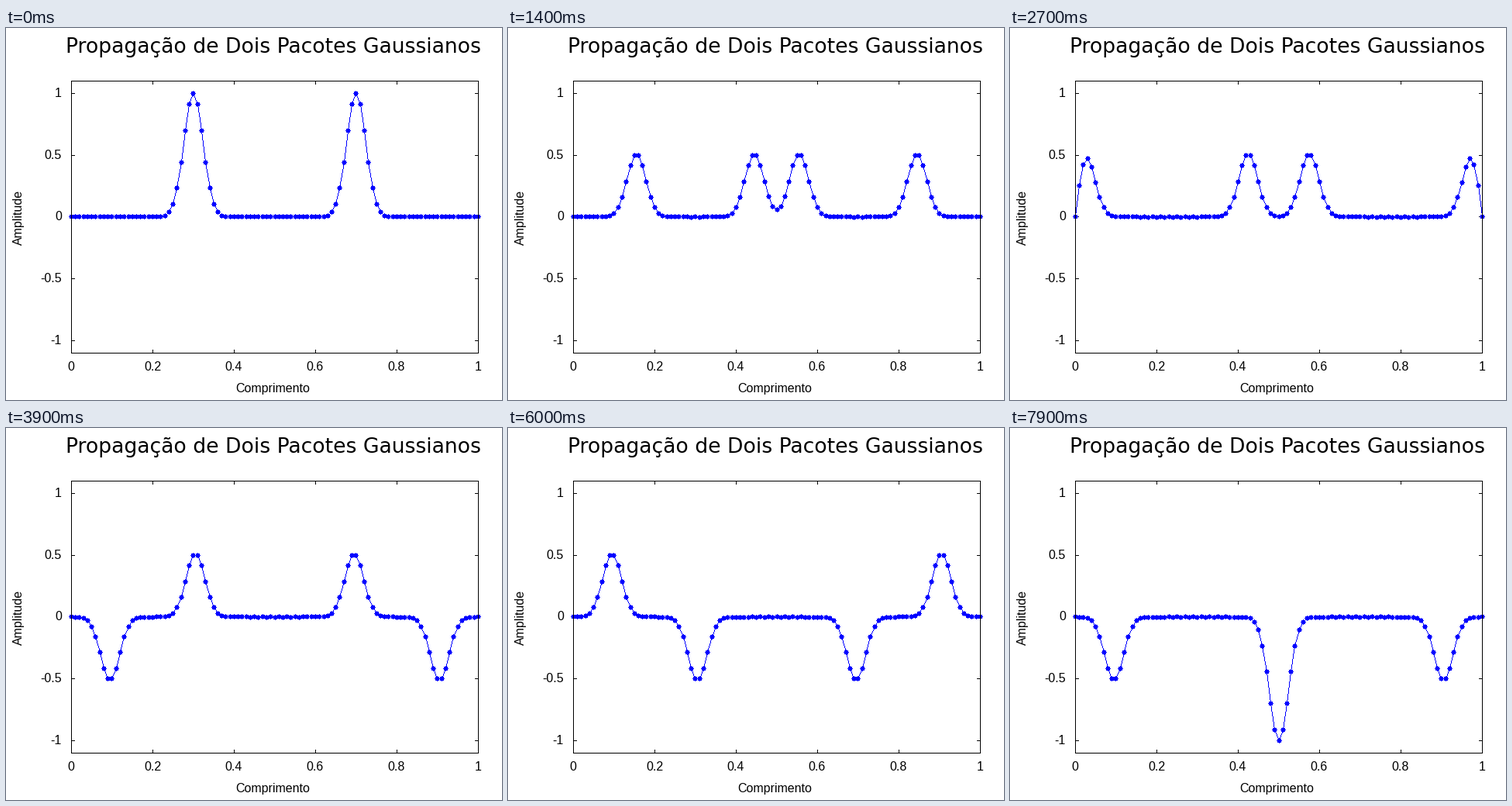
Recreate the animation shown at these times as a matplotlib script. Size 640x480 px, loop 8 s.

```python
import numpy as np
import matplotlib.pyplot as plt
from matplotlib.animation import FuncAnimation
from matplotlib.patches import PathPatch
from matplotlib.path import Path

W, H, DPI = 640, 480, 96
LEFT, RIGHT, TOP, BOTTOM = 84, 609, 68, 419
FRAMES, STEP_MS = 80, 100
N = 101
TIC = 4

fig = plt.figure(figsize=(W / DPI, H / DPI), dpi=DPI, facecolor="white")
ax = fig.add_axes([0, 0, 1, 1])
ax.set(xlim=(0, W), ylim=(H, 0))
ax.axis("off")


def px(x):
    """Pixel column of a length in 0..1."""
    return np.floor(LEFT + (RIGHT - LEFT) * np.asarray(x, float) + 0.5)


def py(v):
    """Pixel row of an amplitude in -1.1..1.1."""
    middle = (TOP + BOTTOM) / 2
    return np.ceil(middle - (BOTTOM - TOP) / 2.2 * np.asarray(v, float) - 0.5)


def boxes(x, y, rx=0, ry=0):
    """Corners of pixel blocks reaching rx, ry around each pixel."""
    x0, x1, y0, y1 = x - rx, x + rx + 1, y - ry, y + ry + 1
    return np.stack([np.stack(p, -1) for p in
                     ((x0, y0), (x1, y0), (x1, y1), (x0, y1), (x0, y0))], 1)


def solid(polys):
    return Path.make_compound_path_from_polys(np.asarray(polys, float))


def fill(path, color, z):
    patch = PathPatch(path, fc=color, ec="none", lw=0, antialiased=False,
                      snap=False, zorder=z)
    return ax.add_patch(patch)


def wave_states():
    """Fixed string, leapfrog scheme with unit Courant number."""
    # Single precision: its rounding noise shows as one-pixel jitter near zero.
    f = np.float32
    x = np.arange(N, dtype=f) * f(0.01)
    y = sum(np.exp(f(-900) * (x - f(c)) ** 2) for c in (0.3, 0.7))
    y[0] = y[-1] = 0
    prev, states = y.copy(), []
    for _ in range(FRAMES):
        states.append(y)
        new = np.zeros(N, f)
        new[1:-1] = y[2:] + y[:-2] - prev[1:-1]
        prev, y = y, new
    return px(x), states


cols, states = wave_states()


def segment(a, b, c, d):
    """Bresenham pixels from (a, b) to (c, d)."""
    if abs(d - b) > abs(c - a) and b > d:
        a, b, c, d = c, d, a, b
    n = max(abs(c - a), abs(d - b))
    k = np.arange(n + 1)

    def walk(p, q):
        return p + np.sign(q - p) * ((2 * k * abs(q - p) + n) // (2 * n))

    return walk(a, c), walk(b, d)


def curve(y):
    rows = py(y)
    lines = [segment(*s) for s in zip(cols, rows, cols[1:], rows[1:])]
    xs, ys = (np.concatenate(p) for p in zip(*lines))
    return solid(np.concatenate([
        boxes(xs, ys), boxes(cols, rows, 2, 2),
        boxes(cols, rows, 3, 0), boxes(cols, rows, 0, 3)]))


def bar(x0, y0, x1, y1):
    return [(x0, y0), (x1 + 1, y0), (x1 + 1, y1 + 1), (x0, y1 + 1), (x0, y0)]


def label(x, y, text, ha="center", size=12, font="Liberation Sans", **kw):
    ax.text(x, y, text, ha=ha, va="baseline", fontsize=size, family=font,
            color="black", **kw)


ticks = []
for v in (0, 0.2, 0.4, 0.6, 0.8, 1):
    x = LEFT + round((RIGHT - LEFT) * v)
    ticks += [bar(x, TOP, x, TOP + TIC), bar(x, BOTTOM - TIC, x, BOTTOM)]
    label(x, 442, f"{v:g}")
for v in (-1, -0.5, 0, 0.5, 1):
    y = float(py(v))
    ticks += [bar(LEFT, y, LEFT + TIC, y), bar(RIGHT - TIC, y, RIGHT, y)]
    label(72, y + 5, f"{v:g}", ha="right")
border = [bar(LEFT, TOP, RIGHT, TOP), bar(LEFT, BOTTOM, RIGHT, BOTTOM),
          bar(LEFT, TOP, LEFT, BOTTOM), bar(RIGHT, TOP, RIGHT, BOTTOM)]
fill(solid(ticks), "black", 1)
fill(solid(border), "black", 3)

label(345, 32, "Propagação de Dois Pacotes Gaussianos", size=20,
      font="DejaVu Sans")
label(344, 470, "Comprimento")
label(21, 244.5, "Amplitude", rotation=90, rotation_mode="anchor")

string = fill(curve(states[0]), "#0000ff", 2)


def update(i):
    string.set_path(curve(states[i]))
    return [string]


anim = FuncAnimation(fig, update, frames=FRAMES, interval=STEP_MS,
                     repeat=True, repeat_delay=0, blit=False)
plt.show()
```
